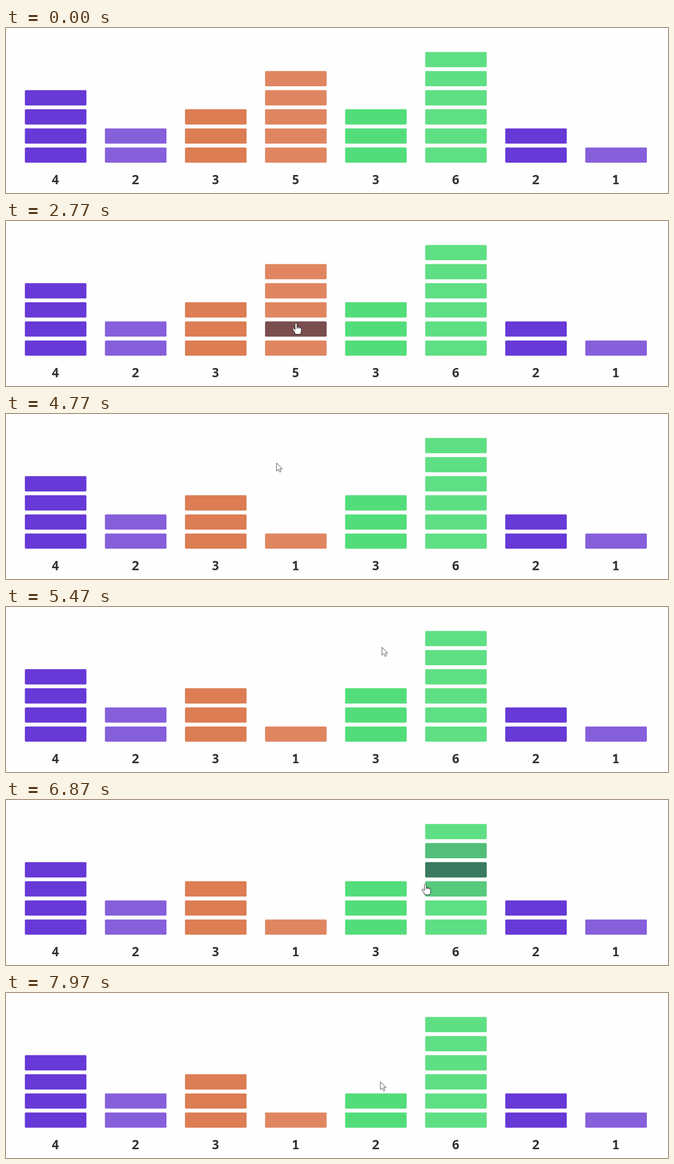
Animation, 1280 px wide and 320 px high, one loop 8 s. Source, as an HTML page with a canvas:

```html
<!DOCTYPE html>
<html lang="en">
<head>
<meta charset="utf-8">
<title>Block stacks</title>
<style>
  html, body { margin: 0; width: 100%; height: 100%; overflow: hidden; background: #fefefe; }
  canvas { display: block; }
</style>
</head>
<body>
<canvas id="stage" width="1280" height="320"></canvas>
<script>
const ctx = document.getElementById('stage').getContext('2d');
const LOOP = 8000, FADE = 250, STEP = 5;
const BLOCK = { w: 119, h: 29.6, gapX: 154.8, gapY: 37.05 };
const COLORS = ['#6739d6', '#865fdb', '#dc7d53', '#df8661', '#52dd7a', '#5fdf84'];
const DARK = '#16173f';
const COUNTS = [4, 2, 3, 5, 3, 6, 2, 1];
const CLICKS = [{ time: 3000, col: 3, count: 1 }, { time: 7760, col: 4, count: 2 }];

// Pointer stops: time, x, y
const PATH = [
  [1780, 706, -24], [2640, 622, 196], [2760, 561, 198], [3200, 561, 198],
  [3570, 538, 160], [3930, 523, 95], [4760, 523, 95], [5100, 610, 63],
  [5450, 727, 78], [5920, 727, 78], [6400, 868, 62], [6530, 875, 85],
  [7200, 742, 207], [7470, 734, 189], [7760, 724, 172]
];

const ARROW = new Path2D('M0 0V15.6L3.6 12.3L6.1 17.9L8.6 16.8L6.2 11.4H11Z');
const HAND = new Path2D('M-2 2C-2-.4 1.6-.4 1.6 2V7.5L8 8.5Q10 9 10 11V15Q10 18 8 21.5' +
  'H-1.5Q-2 18-6.4 12.6C-7.4 10.6-5 9.4-3.6 11.2L-2 13ZM1.6 7.5V11M4.6 8V11M7.4 8.4V11');

const colX = col => 36.5 + col * BLOCK.gapX;
const rowY = row => 231.7 - row * BLOCK.gapY;

function countAt(col, t) {
  const click = CLICKS.find(c => c.col === col && t >= c.time);
  return click ? click.count : COUNTS[col];
}

const slope = (i, k) => (PATH[i + 1][k] - PATH[i][k]) / (PATH[i + 1][0] - PATH[i][0]);

// Harmonic mean keeps the curve from overshooting its stops
function tangent(i, k) {
  if (i === 0 || i === PATH.length - 1) return 0;
  const a = slope(i - 1, k), b = slope(i, k);
  return a * b > 0 ? 2 * a * b / (a + b) : 0;
}

function pointerAt(time) {
  const t = Math.min(Math.max(time, PATH[0][0]), PATH.at(-1)[0]);
  const i = Math.max(0, PATH.findIndex(p => p[0] >= t) - 1);
  const from = PATH[i], to = PATH[i + 1], span = to[0] - from[0];
  const u = (t - from[0]) / span, v = 1 - u;
  return [1, 2].map(k =>
    from[k] * v * v * (1 + 2 * u) + to[k] * u * u * (3 - 2 * u) +
    span * u * v * (v * tangent(i, k) - u * tangent(i + 1, k)));
}

// Block under the pointer as "col,row", or an empty string
function hoverAt(t) {
  const [x, y] = pointerAt(t);
  const col = Math.floor((x - colX(0)) / BLOCK.gapX);
  const row = Math.ceil((rowY(0) - y) / BLOCK.gapY);
  const inside = x < colX(col) + BLOCK.w && y < rowY(row) + BLOCK.h;
  return inside && row >= 0 && row < countAt(col, t) ? col + ',' + row : '';
}

// A linear fade equals the share of recent time spent hovering
function shadesAt(t) {
  const shades = {};
  for (let ago = 0; ago < FADE; ago += STEP) {
    const key = hoverAt(t - ago);
    shades[key] = (shades[key] || 0) + STEP / FADE;
  }
  return shades;
}

function fillBlock(col, row, color, alpha) {
  ctx.globalAlpha = alpha;
  ctx.fillStyle = color;
  ctx.beginPath();
  ctx.roundRect(colX(col), rowY(row), BLOCK.w, BLOCK.h, 2);
  ctx.fill();
  ctx.globalAlpha = 1;
}

function drawColumn(col, t, shades) {
  const count = countAt(col, t);
  for (let row = 0; row < count; row++) {
    fillBlock(col, row, COLORS[col % COLORS.length], 1);
    fillBlock(col, row, DARK, Math.min(1, shades[col + ',' + row] || 0));
  }
  ctx.fillStyle = '#333';
  ctx.fillText(count, colX(col) + BLOCK.w / 2 - 0.5, 303);
}

function drawPointer(t) {
  const hand = hoverAt(t) !== '';
  const shape = hand ? HAND : ARROW;
  ctx.save();
  ctx.translate(...pointerAt(t));
  ctx.fillStyle = '#fff';
  ctx.strokeStyle = hand ? '#222' : '#444';
  ctx.fill(shape);
  ctx.stroke(shape);
  ctx.restore();
}

function draw(t) {
  const shades = shadesAt(t);
  ctx.fillStyle = '#fefefe';
  ctx.fillRect(0, 0, 1280, 320);
  ctx.font = '700 25px "Noto Sans Mono", monospace';
  ctx.textAlign = 'center';
  ctx.lineJoin = 'round';
  COUNTS.forEach((_, col) => drawColumn(col, t, shades));
  drawPointer(t);
}

const start = performance.now();
function tick() {
  draw((performance.now() - start) % LOOP);
  requestAnimationFrame(tick);
}
tick();
</script>
</body>
</html>
```
